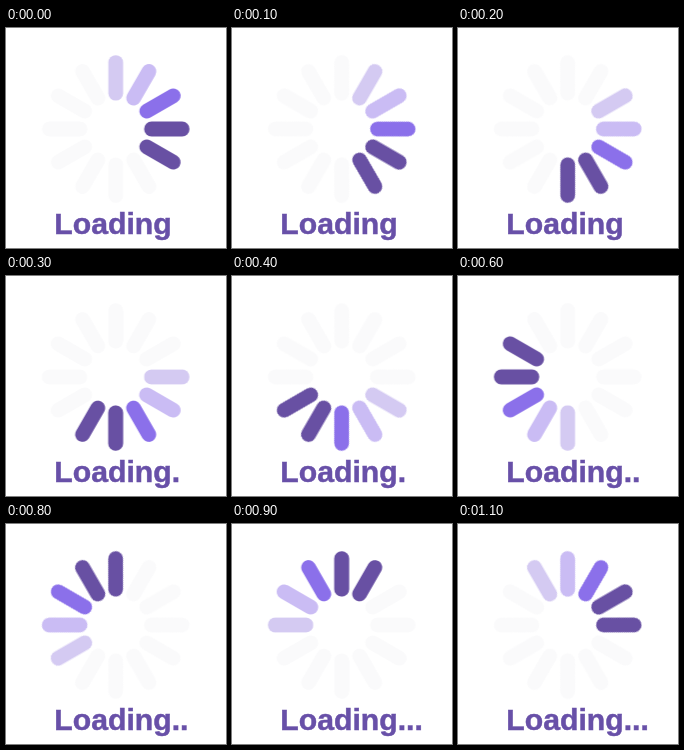
Animation of 220 by 220 pixels, one loop 1200 ms. Source, as an HTML page:

```html
<!DOCTYPE html>
<html lang="en">
<head>
<meta charset="utf-8">
<title>Loading</title>
<style>
  html, body { margin: 0; width: 100%; height: 100%; overflow: hidden; background: #fff; }
  svg { display: block; width: 100vw; height: 100vh; }

  .wheel {
    stroke-width: 14.8;
    stroke-linecap: round;
    animation: turn 1.2s steps(12) infinite;
  }
  .wheel line { stroke: #fafafb; transform: rotate(calc(var(--i) * 30deg)); }
  .wheel .dark { stroke: #6850a3; }
  .wheel .mid { stroke: #8b70ea; }
  .wheel .light { stroke: #cabcf4; }
  .wheel .pale { stroke: #d4caf2; }

  text {
    font: bold 30.2px "Liberation Sans", Arial, Helvetica, sans-serif;
    fill: #6850a8;
    stroke: #6850a8;
    stroke-width: .5;
  }
  .dot { animation: 1.2s step-end infinite; }
  .one { animation-name: one; }
  .two { animation-name: two; }
  .three { animation-name: three; }

  @keyframes turn { to { transform: rotate(360deg); } }
  @keyframes one { 0% { fill-opacity: 0; stroke-opacity: 0; } 25%, 100% { fill-opacity: 1; stroke-opacity: 1; } }
  @keyframes two { 0% { fill-opacity: 0; stroke-opacity: 0; } 50%, 100% { fill-opacity: 1; stroke-opacity: 1; } }
  @keyframes three { 0% { fill-opacity: 0; stroke-opacity: 0; } 75%, 100% { fill-opacity: 1; stroke-opacity: 1; } }
</style>
</head>
<body>
<svg viewBox="0 0 220 220">
  <g transform="translate(109.7 101)">
    <!-- --i is the clock hour of each spoke at the start of the loop -->
    <g class="wheel">
      <line y1="-35.8" y2="-66.4" style="--i:5"/>
      <line y1="-35.8" y2="-66.4" style="--i:6"/>
      <line y1="-35.8" y2="-66.4" style="--i:7"/>
      <line y1="-35.8" y2="-66.4" style="--i:8"/>
      <line y1="-35.8" y2="-66.4" style="--i:9"/>
      <line y1="-35.8" y2="-66.4" style="--i:10"/>
      <line y1="-35.8" y2="-66.4" style="--i:11"/>
      <line y1="-35.8" y2="-66.4" style="--i:0" class="pale"/>
      <line y1="-35.8" y2="-66.4" style="--i:1" class="light"/>
      <line y1="-35.8" y2="-66.4" style="--i:2" class="mid"/>
      <line y1="-35.8" y2="-66.4" style="--i:3" class="dark"/>
      <line y1="-35.8" y2="-66.4" style="--i:4" class="dark"/>
    </g>
  </g>
  <text x="48.3" y="206">Loading<tspan class="dot one">.</tspan><tspan class="dot two">.</tspan><tspan class="dot three">.</tspan></text>
</svg>
</body>
</html>
```
